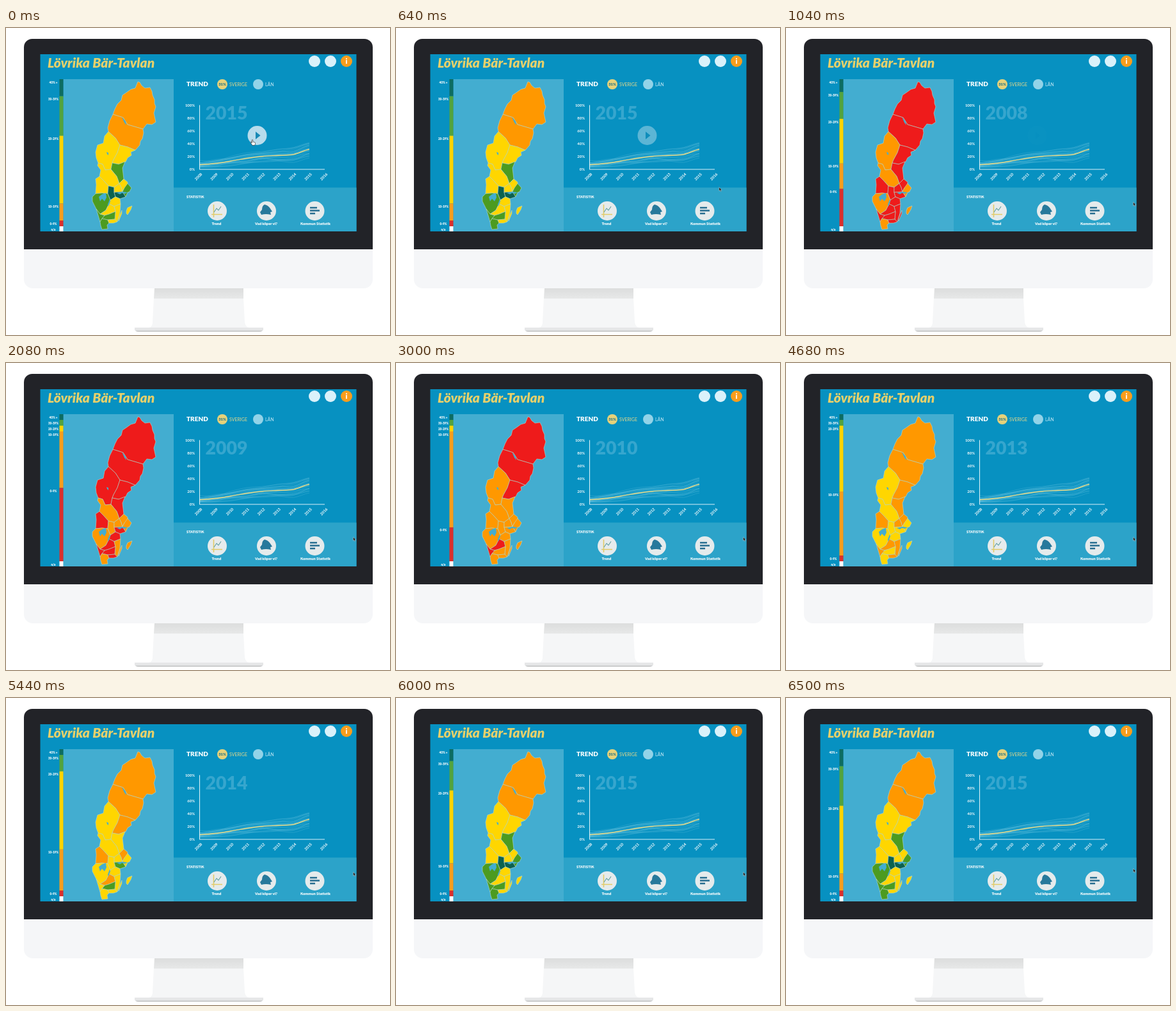
Animation of 600 by 480 pixels, one loop 6.52 s. Source, as an HTML page:

```html
<!DOCTYPE html>
<html lang="sv">
<head>
<meta charset="utf-8">
<title>Lövrika Bär-Tavlan</title>
<style>
html, body { margin: 0; width: 100%; height: 100%; overflow: hidden; background: #fff; }
svg { display: block; width: 600px; height: 480px; font-family: Lato, "Open Sans", sans-serif; fill: #fff; }
.bold { font-weight: 900; }
.mid { text-anchor: middle; }
#map path { stroke: #b5d9c9; stroke-width: .6; stroke-linejoin: round; }
#lakes path { fill: #43add0; }
#lines path { fill: none; stroke: #8ed4e8; stroke-width: .6; opacity: .33; }
</style>
</head>
<body>
<svg viewBox="0 0 600 480">
  <defs>
    <linearGradient id="neck" x2="0" y2="1">
      <stop stop-color="#dcdddd"/><stop offset="1" stop-color="#e7e8e8"/>
    </linearGradient>
  </defs>

  <!-- monitor -->
  <path fill="#222328" d="M28 347V30A13 13 0 0 1 41 17H560A13 13 0 0 1 573 30V347Z"/>
  <path fill="#f5f6f8" d="M28 346H573V393A14 14 0 0 1 559 407H42A14 14 0 0 1 28 393Z"/>
  <path fill="#f5f6f7" d="M231 422H371L373 460Q374 467 380 469H223Q229 467 229 460Z"/>
  <path fill="url(#neck)" d="M232 407H371V423H231Z"/>
  <path fill="#e5e6e7" d="M201 468.500H402V472Q400 475 396 475H207Q203 475 201 472Z"/>
  <path fill="#cbcccd" d="M202 473H401Q399 475 396 475H207Q204 475 202 473Z"/>

  <!-- page -->
  <rect x="53.500" y="41" width="494" height="277" fill="#0791c1"/>
  <rect x="89.500" y="80" width="172.500" height="238" fill="#43add0"/>
  <rect x="262" y="249.500" width="285.500" height="68.500" fill="#2ca3c9"/>
  <text x="65" y="62" font-size="21" font-style="italic" class="bold" fill="#e6d06b">Lövrika Bär-Tavlan</text>
  <circle cx="482" cy="52" r="9" fill="#d9f1fa"/>
  <circle cx="507" cy="52" r="9" fill="#d9f1fa"/>
  <circle cx="532" cy="52" r="9" fill="#f99d1c"/>
  <text x="532" y="56" font-size="11" class="bold mid">i</text>

  <g id="bar"></g>

  <g id="map">
    <path d="M206 84L209 85 212 90 217 94 225 93 228 99 229 105 232 112 232 118 234 123 231 133 234 147 228 151 220 150 214 158 190 151 183 140 167 135 170 127 174 119 180 113 182 105 188 101 195 96 202 94Z"/>
    <path d="M167 135L183 140 190 151 214 158 215 164 213 173 210 177 209 183 202 191 190 186 178 183 171 172 160 162 159 156 162 145Z"/>
    <path d="M160 162L171 172 178 183 174 195 168 206 166 211 164 221 155 222 151 213 144 211 141 203 140 194 143 183 152 180 154 169Z"/>
    <path d="M178 183L190 186 202 191 195 194 196 199 190 203 187 209 176 213 166 211 168 206 174 195Z"/>
    <path d="M166 211L176 213 186 209 182 219 184 236 177 243 173 232 164 221Z"/>
    <path d="M144 211L151 213 155 222 164 221 173 232 177 243 169 249 160 247 152 238 146 232 148 222 143 215Z"/>
    <path d="M146 232L152 238 160 247 159 259 150 258 140 259 141 245 140 236Z"/>
    <path d="M160 247L169 249 169 257 171 264 163 269 159 259Z"/>
    <path d="M169 249L177 243 180 249 182 256 169 257Z"/>
    <path d="M177 243L184 236 190 241 190 246 185 250 182 256 180 249Z"/>
    <path d="M190 243L196 250 193 256 190 257 187 264 182 256 185 250Z"/>
    <path d="M169 257L182 256 187 264 178 267 171 264Z"/>
    <path d="M163 269L171 264 178 267 179 275 169 279 161 275Z"/>
    <path d="M140 259L150 258 159 259 163 269 161 275 156 285 147 291 141 283 135 271 135 264Z"/>
    <path d="M161 275L169 279 171 287 161 291 154 293 147 291 156 285Z"/>
    <path d="M169 279L179 275 178 290 174 303 170 299 171 287ZM181 285L181 290 176 302 176 297Z"/>
    <path d="M154 293L161 291 171 287 170 299 159 300 150 298Z"/>
    <path d="M141 283L147 291 154 293 150 298 147 303 144 293Z"/>
    <path d="M147 303L150 298 159 300 161 305 158 308 159 314 150 315 148 309Z"/>
    <path d="M159 300L170 299 174 303 168 305 161 305Z"/>
    <path d="M190 281L197 278 195 284 190 292 188 290 188 286Z"/>
  </g>
  <g id="lakes">
    <path d="M145 264L150 260 156 258 157 265 154 271 150 267 147 271Z"/>
    <path d="M162 268L163 271 160 279 159 276Z"/>
    <path d="M173 258L182 256 190 257 186 259 181 258 178 260Z"/>
    <path d="M157 194L160 195 160 199 158 197Z"/>
    <path d="M181 139L187 146 188 152 185 148Z"/>
  </g>

  <!-- trend chart -->
  <text x="282" y="91" font-size="10" class="bold">TREND</text>
  <circle cx="338" cy="88" r="8" fill="#e6d27a"/>
  <text x="338" y="90" font-size="5.800" class="bold mid" fill="#176f86">31%</text>
  <text x="349" y="90.800" font-size="7" fill="#e6d889">SVERIGE</text>
  <circle cx="394" cy="88" r="8" fill="#92d3e8"/>
  <text x="405" y="90.800" font-size="7" fill="#c5e8f4">LÄN</text>
  <text id="year" x="311.500" y="143" font-size="28.500" class="bold" fill="#36a6ce"></text>
  <g id="lines"></g>
  <path id="mean" fill="none" stroke="#ecdc88" stroke-width="1.400"/>
  <path d="M302.500 120.500V221H498" fill="none" stroke="#d9f0f8" stroke-width="1.100"/>
  <g id="axis" font-size="5.900" font-weight="700" text-anchor="end"></g>

  <!-- statistics -->
  <text x="282" y="266.300" font-size="5.700" class="bold">STATISTIK</text>
  <g fill="#e5ebec">
    <circle cx="330" cy="286" r="15"/><circle cx="407" cy="286" r="15"/><circle cx="482.500" cy="286" r="15"/>
  </g>
  <g class="bold mid" font-size="5.800">
    <text x="329" y="308">Trend</text>
    <text x="406.500" y="308">Vad köper vi?</text>
    <text x="483.500" y="308">Kommun Statistik</text>
  </g>
  <path d="M324.500 276V296M321 291.500H338" fill="none" stroke="#e2cb68" stroke-width="1.600"/>
  <path d="M325 288L329 282 332 285 336 279" fill="none" stroke="#5f9fa0" stroke-width="1.100"/>
  <path fill="#26799c" d="M397 288L400 284Q400 278 404 276Q409 277 412 281L416 287 413 288 414 292Q406 290 399 292Z"/>
  <path d="M475 281H486M475 285.500H490M475 290H483" stroke="#286f91" stroke-width="2.600"/>

  <g id="play">
    <circle cx="392.500" cy="168" r="15" fill="#b7dcec"/>
    <path fill="#1689b5" d="M390 162L397.500 168 390 174Z"/>
  </g>
  <path id="hand" d="M-.8 0Q0-1.200.8 0V3L4 3.800Q5 4.500 4.300 7L3.500 8.500H0L-2.500 5Q-2-.1-.8 5Z" stroke="#222" stroke-width=".6"/>
  <path id="arrow" d="M0 0V6L1.400 4.800 2.500 7 3.500 6.500 2.500 4.500H4.300Z" fill="#222" stroke="#d8edf5" stroke-width=".4"/>
</svg>
<script>
const LOOP = 6520, CLICK = 210, STEP = 700, FIRST = CLICK + STEP, GROW = 350;
const LEVELS = "dgyor";
const MAP_COLORS = { d: "#0c614f", g: "#4c9b20", y: "#ffd600", o: "#ff9800", r: "#ee1b1b" };
const BAR_COLORS = ["#0e6d61", "#53a33e", "#ffd400", "#f99d1c", "#db302c", "#fff"];
const BAR_LABELS = ["40% +", "30-39%", "20-29%", "10-19%", "0-9%", "n/a"];

// One level letter per county, north to south, for each year from 2008.
const YEARS = [
  "rrorrorrrrorrorrrroro",
  "rrrrroroooorrororroro",
  "rrorooooooooooroorooo",
  "rroroooooooooooooooo" + "y",
  "ooyooyoyyoyyyyoyyoyyy",
  "ooyooyoyooyyyyooyoyoy",
  "ooyoyyoyyoygyyoygyyyy",
  "ooyygyydyygdygyygggyy"
];

const $ = id => document.getElementById(id);
const clamp = v => Math.max(0, Math.min(1, v));
const ease = p => p * p * (3 - 2 * p);

function add(parent, tag, attrs, text) {
  const el = document.createElementNS("http://www.w3.org/2000/svg", tag);
  for (const key in attrs) el.setAttribute(key, attrs[key]);
  if (text !== undefined) el.textContent = text;
  parent.appendChild(el);
  return el;
}

// Smooth curve with one value per year.
function curve(values) {
  const x = i => 302.5 + 24.5 * i;
  const slope = k => ((values[k + 1] ?? values[k]) - (values[k - 1] ?? values[k])) / 6;
  let d = `M${x(0)} ${values[0]}`;
  for (let i = 1; i < values.length; i++) {
    d += `C${x(i - 1) + 8.2} ${values[i - 1] + slope(i - 1)} ${x(i) - 8.2} ${values[i] - slope(i)} ${x(i)} ${values[i]}`;
  }
  return d;
}

let seed = 7;
const random = () => (seed = seed * 16807 % 2147483647) / 2147483647;

const mean = [213.7, 211.8, 208, 203.7, 200.7, 199.2, 197.7, 189.7];
$("mean").setAttribute("d", curve(mean));
for (let n = 0; n < 21; n++) {
  const spread = (n - 10) / 10;
  const values = mean.map((y, i) => Math.min(217.5, y + spread * (4.5 + i) + (random() - .5) * 4));
  add($("lines"), "path", { d: curve(values) });
}

for (let i = 0; i <= 5; i++) add($("axis"), "text", { x: 295, y: 223 - 20 * i }, 20 * i + "%");
for (let i = 0; i <= 8; i++) {
  add($("axis"), "text", { transform: `translate(${307 + 24.5 * i} 229) rotate(-45)` }, 2008 + i);
}

const segments = BAR_COLORS.map((fill, i) => ({
  rect: add($("bar"), "rect", { x: 83.5, width: 6, fill }),
  label: add($("bar"), "text", { x: 74, "font-size": 4.6, class: "bold mid" }, BAR_LABELS[i])
}));
const counties = [...$("map").children];
const counts = YEARS.map(y => [...LEVELS].map(c => y.split(c).length - 1));

function drawBar(from, to, p) {
  const base = 9, unit = (230 - 5 * base) / 21;
  let y = 80;
  segments.forEach(({ rect, label }, i) => {
    const h = i < 5 ? base + unit * (from[i] + (to[i] - from[i]) * p) : 318 - y;
    rect.setAttribute("y", y);
    rect.setAttribute("height", h);
    label.setAttribute("y", y + 6.5);
    y += h;
  });
}

function draw(t) {
  const started = t >= FIRST;
  const year = started ? Math.min(7, Math.floor((t - FIRST) / STEP)) : 7;
  const grow = started ? clamp((t - FIRST - year * STEP) / GROW) : 1;
  $("year").textContent = 2008 + year;
  counties.forEach((el, i) => el.setAttribute("fill", MAP_COLORS[YEARS[year][i]]));
  drawBar(counts[(year + 7) % 8], counts[year], grow);

  $("play").setAttribute("opacity", 1 - clamp((t - CLICK) / 840));

  const move = ease(clamp((t - 300) / 500));
  const x = 385 + 157.5 * move;
  const y = 175 + 97 * move - 5.5 * ease(clamp((t - 6250) / 200));
  const hovering = x < 407;
  $("hand").setAttribute("visibility", hovering ? "visible" : "hidden");
  $("arrow").setAttribute("visibility", hovering ? "hidden" : "visible");
  for (const id of ["hand", "arrow"]) $(id).setAttribute("transform", `translate(${x} ${y})`);
}

const start = performance.now();
function tick() {
  draw((performance.now() - start) % LOOP);
  requestAnimationFrame(tick);
}
tick();
</script>
</body>
</html>
```
